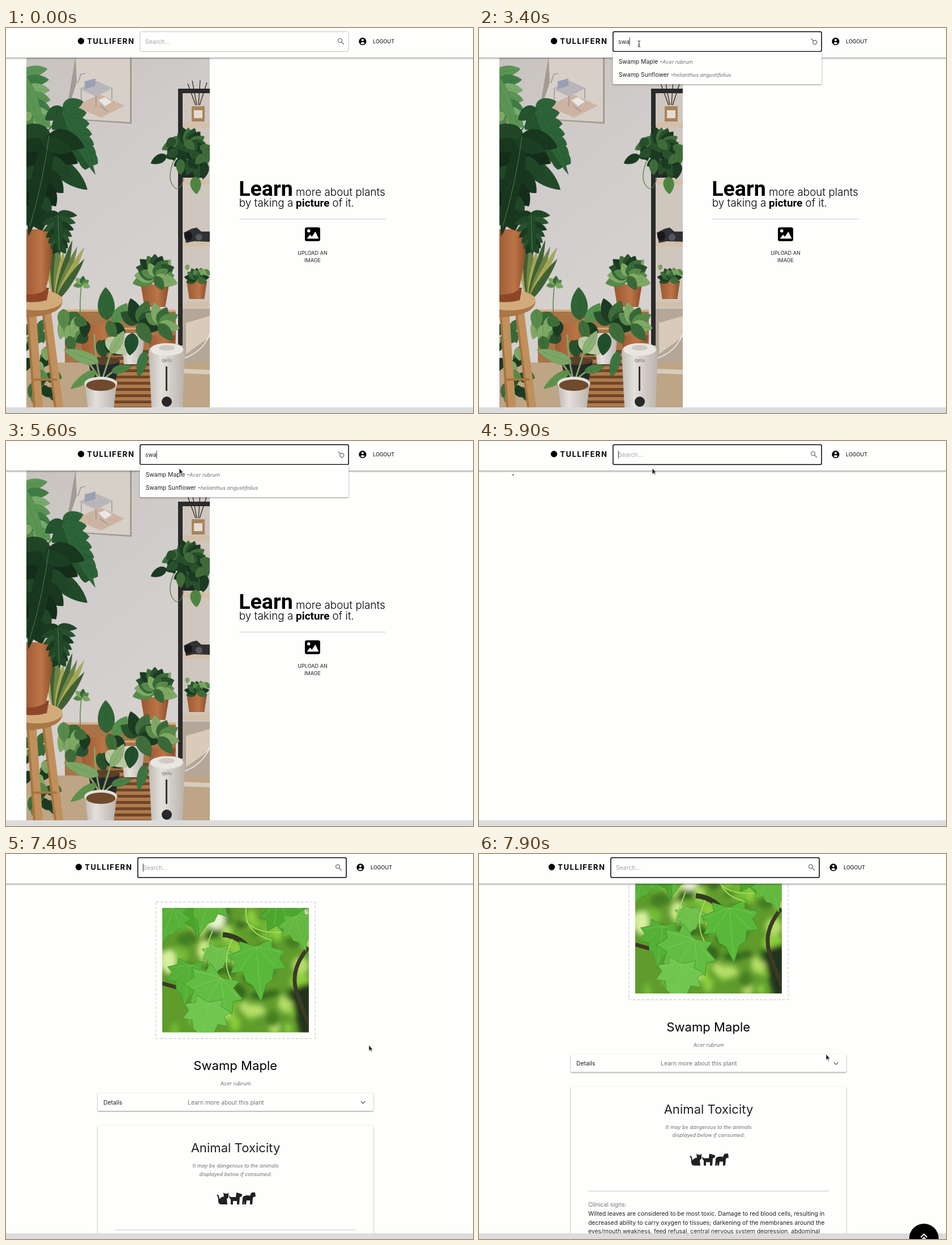
Recreate the animation shown at these times as an HTML page. Size 825 px wide and 679 px high, loop 8000 ms.

```html
<!DOCTYPE html>
<html lang="en">
<head>
<meta charset="utf-8">
<style>
  html, body { margin: 0; width: 100%; height: 100%; overflow: hidden; background: #fefefd; }
  svg { display: block; font: 10.4px Inter, sans-serif; fill: #212121; }
  text { white-space: pre; }
  .light { font-weight: 300; font-size: 18.9px; fill: #000; }
  .strong { font-family: Roboto, sans-serif; font-weight: 700; }
  .small { font-size: 9.1px; }
  .latin { font-size: 9.1px; font-style: italic; fill: #6f6f6f; }
  .title { font-size: 22.1px; }
  .mid { text-anchor: middle; }
  .grey { fill: #757575; }
  .card { fill: #fefefd; filter: drop-shadow(0 1px 1.2px #0007); }
  .line { fill: none; stroke: #c9c9c9; }
</style>
</head>
<body>
<svg width="825" height="679" viewBox="0 0 825 679">
  <defs>
    <clipPath id="roomClip"><path d="M36 50h324v619H36z"/></clipPath>
    <clipPath id="mapleClip"><path d="M276 95h259v219.5H276z"/></clipPath>
    <linearGradient id="wall" x2=".4" y2="1">
      <stop stop-color="#c8c3be"/><stop offset=".4" stop-color="#d0cccb"/><stop offset="1" stop-color="#d8d4d1"/>
    </linearGradient>
    <linearGradient id="clay"><stop stop-color="#9a5731"/><stop offset=".6" stop-color="#bb7546"/><stop offset="1" stop-color="#8a4c2b"/></linearGradient>
    <linearGradient id="white"><stop stop-color="#c0bab5"/><stop offset=".35" stop-color="#e4e0dc"/><stop offset="1" stop-color="#b9b2ac"/></linearGradient>
    <filter id="soft"><feGaussianBlur stdDeviation="5"/></filter>
    <path id="mapleLeaf" d="M0 0-30-12-28 4-52 12-40 24-50 44-28 44-24 62-12 70 0 100 12 70 24 62 28 44 50 44 40 24 52 12 28 4 30-12Z"/>
  </defs>

  <g id="home">
    <g id="room" clip-path="url(#roomClip)"></g>
    <text class="light" y="296"><tspan class="strong" x="411.2" font-size="37.6">Learn</tspan><tspan x="512">more about plants</tspan></text>
    <text class="light" y="314.5"><tspan x="411.8">by taking a</tspan><tspan class="strong" x="512">picture</tspan><tspan x="576.5">of it.</tspan></text>
    <path class="line" d="M412 337H671"/>
    <rect x="528" y="351.5" width="27" height="24.5" rx="3.5" fill="#000"/>
    <path d="M531.5 371.5l5.5-7 3.5 3.5 6-9 6 12.5z" fill="#fefefd"/><circle cx="534.8" cy="357.7" r="2.8" fill="#fefefd"/>
    <g class="small mid"><text x="541.5" y="400">UPLOAD AN</text><text x="541.5" y="413">IMAGE</text></g>
  </g>

  <path id="dot" d="M59 59h2.5v1.5H59z"/>

  <g id="plant">
    <path d="M264.7 84.5H546.3V325.5H264.7z" fill="none" stroke="#d3d3d3" stroke-width="1.3" stroke-dasharray="5 3"/>
    <g id="maple" clip-path="url(#mapleClip)"></g>
    <g class="mid">
      <text class="title" x="405.3" y="381" style="fill:#000">Swamp Maple</text>
      <text class="latin" x="405.7" y="408">Acer rubrum</text>
    </g>
    <rect class="card" x="162" y="421.5" width="487" height="31.5" rx="2"/>
    <text x="172" y="441.5">Details</text><text class="grey" x="321" y="441.5">Learn more about this plant</text>
    <path d="M627 436l3.7 3.7 3.7-3.7" fill="none" stroke="#666" stroke-width="1.4"/>
    <rect class="card" x="162" y="478.5" width="487" height="500" rx="2"/>
    <g class="mid">
      <text class="title" x="405.5" y="526">Animal Toxicity</text>
      <text class="latin" x="405.7" y="553">It may be dangerous to the animals</text>
      <text class="latin" x="405.7" y="567.5">displayed below if consumed:</text>
    </g>
    <path d="M372 601q3-1 4 2 1 4 1 6 2-4 8-5l-1-7 3 2h4l2-2v7q0 3-3 4l1 10h-10q-6 0-6-6 0-8-3-11z
      M394 602l3 3h9l1-8 4 1 6 2v3q-1 2-4 2l-1 13h-4v-6h-7v6h-4v-9q-3-2-3-7z
      M417 618l1-9q-1-4 3-6 6-2 10 0l2-5q3-2 7-1l1 7-4 1-1 2-1 11h-4v-7h-6l-1 7h-3v-6l-1 6z"/>
    <path class="line" d="M193 663H618"/>
    <text class="grey" x="193" y="690.5">Clinical signs:</text>
    <text x="193" y="706.5">Wilted leaves are considered to be most toxic. Damage to red blood cells, resulting in</text>
    <text x="193" y="722">decreased ability to carry oxygen to tissues; darkening of the membranes around the</text>
    <text x="193" y="737.5">eyes/mouth,weakness, feed refusal, central nervous system depression, abdominal</text>
  </g>

  <path d="M-9-9H834V52.3H-9z" fill="#fefefd" style="filter:drop-shadow(0 1.5px 1.6px #0008)"/>
  <g id="header">
    <circle cx="132.5" cy="23" r="5.7" fill="#000"/>
    <text x="143.3" y="28.4" style="font-size:13px;font-weight:700;letter-spacing:1.5px;fill:#000">TULLIFERN</text>
    <rect id="field" x="236.8" y="6.6" width="368.4" height="35" rx="2.6" fill="#fefefd"/>
    <text id="hint" x="246" y="28" fill="#a5a5a5">Search...</text>
    <text id="query" x="246" y="28"></text>
    <path id="caret" d="M0 17v14" stroke="#000" stroke-width=".8"/>
    <g id="lens" fill="none" stroke="#757575" stroke-width="1.4"><circle cx="-1.6" cy="-1.6" r="3.5"/><path d="M1.2 1.2l4 4"/></g>
    <circle cx="630" cy="23.7" r="6.6" fill="#000"/>
    <circle cx="630" cy="21.3" r="2" fill="#fefefd"/><path d="M626.2 26.7q3.8-4 7.6 0-3.8 4-7.6 0" fill="#fefefd"/>
    <text class="small" x="648" y="27" style="fill:#000">LOGOUT</text>
  </g>
  <g id="list"></g>
  <path d="M0 669H825V679H0z" fill="#dcdcdc"/>
  <g id="toTop"><circle cx="786" cy="678" r="26" fill="#000"/><path d="M780.5 676l5.5-5.5 5.5 5.5m-11 6l5.5-5.5 5.5 5.5" fill="none" stroke="#fff" stroke-width="2"/></g>
  <path id="arrow" d="M0 0V10.5L2.4 8.3 4 12 5.6 11.3 4 7.8H7.2Z" stroke="#fff" stroke-width=".6"/>
  <path id="beam" d="M-2.2-5.5q2.2 0 2.2 1.5 0-1.5 2.2-1.5M0-4V4M-2.2 5.5q2.2 0 2.2-1.5 0 1.5 2.2 1.5M-1.3 1.5h2.6" fill="none" stroke="#222"/>
</svg>
<script>
const $ = id => document.getElementById(id);
let seed = 11;
const rnd = () => (seed = seed * 16807 % 2147483647) / 2147483647;
const repeat = (n, make) => Array.from({ length: n }, (_, i) => make(i)).join('');
const shape = (fill, d) => `<path fill="${fill}" d="${d}"/>`;
const stroke = (color, width, d) => `<path fill="none" stroke="${color}" stroke-width="${width}" d="${d}"/>`;
const oval = (fill, x, y, rx, ry = rx) => `<ellipse fill="${fill}" cx="${x}" cy="${y}" rx="${rx}" ry="${ry}"/>`;
const leaf = (fill, x, y, len, angle, w) =>
  `<path fill="${fill}" stroke="#0a2a1033" stroke-width=".6" transform="translate(${x} ${y})rotate(${angle})"
    d="M0 0C${len * .15} ${-w} ${len * .7} ${-w * .8} ${len} 0C${len * .7} ${w * .8} ${len * .15} ${w} 0 0M0 0H${len * .8}"/>`;
const fan = (colors, x, y, n, from, to, len, w) => repeat(n, i =>
  leaf(colors[i % colors.length], x, y, len * (.8 + .25 * rnd()), from + (to - from) * i / (n - 1), w));
const bush = (colors, x, y, rx, ry, n, len) => repeat(n, i => leaf(colors[i % colors.length],
  x + rx * (rnd() * 2 - 1), y + ry * (rnd() * 2 - 1), len * (.7 + .5 * rnd()), 20 + 140 * rnd(), len * .42));
// A midrib with finger lobes on both sides
const monstera = (colors, x, y, len, angle, reach) => `<g transform="translate(${x} ${y})rotate(${angle})">` +
  repeat(14, i => {
    const along = (i >> 1) / 6, side = i % 2 ? 1 : -1;
    return leaf(colors[i % colors.length], len * .72 * along, 0, reach * (1 - .35 * along), side * (80 - 50 * along), len * .13);
  }) + leaf(colors[0], 0, 0, len, 0, reach * .35) + '</g>';
const pot = (fill, x, y, w, h) => shape(fill, `M${x} ${y}h${w}l${-w * .13} ${h}h${-w * .74}z`);

const dark = ['#19371f', '#214627', '#142d1a'];
const mid = ['#28502d', '#1b3b22', '#3f6d3a'];
const fresh = ['#588a4a', '#7fa965', '#386a38'];

$('room').innerHTML =
  shape('url(#wall)', 'M36 50H360V669H36z') +
  // poster
  shape('#a39b92', 'M123 50H222V169L104 161z') + shape('#d6d0c9', 'M123 50H219V166L104 159 125 96z') +
  shape('#cdb4a2', 'M120 138L166 117 210 137 168 158z') + shape('#b9b6bb', 'M129 107l31-14 29 13-30 15z') +
  shape('#9aa0b4', 'M139 94l19-5v13l-19 6z') + shape('#e8e6e6', 'M163 127l12-5 12 8-12 8z') +
  stroke('#8d8990', 1.2, 'M133 109v22M187 107v18M159 120v18M127 97l5-15 8-2M166 137l14 10') +
  // shelf
  shape('#cfc6bd', 'M312 115H360V600H312z') + shape('#b5a797', 'M312 495H360V600H312z') + shape('#d9cbb9', 'M318 520L360 508V545L318 575z') +
  stroke('#2a2b2b', 8, 'M360 111H308V560') +
  repeat(4, i => shape('#d2c0a9', `M312 ${[167, 267, 376, 483][i]}H360v9H312z`)) +
  stroke('#312b26', 1.3, 'M335 136l-14-38M337 136l-8-43M340 136l3-44M342 136l13-40') +
  shape('#a9835b', 'M328 138h23v27h-23z') + shape('#e4dcd2', 'M332 145h15v14h-15z') +
  shape('#222a25', 'M304 212h50l-7 52h-36z') +
  fan(mid, 322, 208, 11, -190, 10, 36, 14) + bush(mid, 318, 215, 36, 22, 24, 28) + leaf('#4e8540', 334, 262, 31, 85, 14) +
  stroke('#55803c', 1.3, 'M296 235q-14 35 4 48 10 3 14-20') +
  shape('#303135', 'M314 361l14-7 9-2 8 7h15v18l-28-1-14 3z') + oval('#17181a', 322, 367, 7, 8) + oval('#55585c', 341, 369, 6) +
  pot('url(#clay)', 319, 446, 36, 32) + fan(mid, 337, 442, 9, -200, 20, 22, 9) + bush(fresh, 336, 426, 15, 9, 8, 14) +
  // calathea and its stand
  shape('#a87447', 'M104 500H300V590H104z') + stroke('#d3ab7b', 3, 'M104 498H300M104 530H300') +
  pot('url(#clay)', 238, 452, 50, 40) +
  fan(fresh, 263, 440, 11, -195, 15, 41, 17) + fan(mid, 263, 428, 7, -170, -10, 34, 13) + fan(fresh, 264, 438, 6, -160, 60, 28, 12) +
  // snake plant
  fan(['#a8a852', '#3f6135', '#6d8547'], 88, 482, 8, -100, -56, 112, 9) +
  // floor and crate
  shape('#bda586', 'M36 590H360V669H36z') + shape('#6f4527', 'M190 568H262V669H190z') +
  repeat(9, i => shape('#ae7a4b', `M190 ${574 + i * 11}h72v6h-72z`)) +
  shape('#d8cbb9', 'M314 601l46 2v8l-46-2z') + stroke('#eee', 1.5, 'M360 540q-12 30-44 42') +
  bush(mid, 58, 575, 24, 62, 18, 30) + bush(fresh, 52, 590, 20, 60, 10, 26) +
  // lower jungle
  stroke('#5f8a50', 1.6, 'M133 455q-4 40 0 60M178 470v60M205 495q6 40 0 60') + fan(fresh, 135, 452, 5, -190, 20, 16, 7) +
  pot('url(#clay)', 128, 522, 75, 60) + pot('url(#white)', 203, 538, 42, 55) + pot('url(#clay)', 250, 542, 50, 34) +
  leaf('#2f6435', 178, 515, 58, -92, 22) + leaf('#54904c', 190, 520, 42, -55, 16) +
  bush(fresh, 118, 512, 22, 22, 8, 38) + bush(mid, 150, 535, 44, 22, 9, 34) +
  fan(mid, 234, 520, 6, -150, 60, 44, 18) + fan(fresh, 270, 522, 6, -140, 50, 38, 15) +
  leaf('#214f2c', 224, 538, 40, 98, 18) + leaf('#3c7540', 246, 570, 48, 105, 13) +
  pot('#26292a', 145, 586, 56, 36) + oval('#59402c', 173, 587, 27, 7) +
  stroke('#83a569', 3, 'M168 625Q150 590 128 572M168 625Q158 590 156 540M168 625Q184 580 190 550M168 625Q190 600 206 602') +
  leaf('#bcc8a0', 176, 548, 46, 35, 20) + leaf('#7ba665', 164, 590, 66, -160, 16) + leaf('#5d924c', 160, 604, 56, -215, 12) +
  leaf('#8db074', 185, 575, 48, -60, 13) + leaf('#498043', 186, 606, 38, -15, 11) +
  pot('url(#white)', 139, 624, 57, 60) + oval('#e4e0da', 167.5, 627, 29, 12) + oval('#6f4a2d', 167.5, 630, 26, 10) +
  // stool and clay pot
  stroke('#c0905c', 14, 'M46 495L58 669M72 495L94 669') + stroke('#a8743f', 4, 'M38 500L50 669M66 505L87 669M46 620H90') +
  shape('#a97745', 'M30 482H100Q98 508 30 511z') + oval('#d3ab7a', 55, 480, 45, 18) +
  shape('#8c4728', 'M30 458H76L72 480Q50 486 30 482z') + shape('url(#clay)', 'M30 355H84Q82 420 70 462 50 474 30 468z') +
  // monstera
  stroke('#3e7338', 2.5, 'M60 200Q80 170 106 150M50 120Q70 180 78 230') +
  monstera(['#5b9455', '#78aa6c', '#3f7c45'], 28, 80, 112, 70, 46) + bush(fresh, 42, 165, 10, 18, 4, 30) +
  monstera(['#2d6338', '#24532d'], 100, 140, 132, 64, 38) +
  leaf('#214a29', 78, 230, 86, 40, 24) + oval('#17351f', 58, 258, 34, 66) +
  monstera(dark, 78, 186, 185, 102, 66) + leaf('#1c3f24', 64, 200, 56, 18, 20) +
  monstera(['#214828', '#1a3a21', '#295330'], 92, 326, 74, 88, 34) +
  stroke('#4f7f4b', 1, 'M76 190Q66 270 42 350M92 330L94 392') +
  // humidifier
  shape('url(#white)', 'M252 572Q252 557 284 556T316 572L312 669H257z') + oval('#e9e5e1', 284, 567, 29, 11) + oval('#cfc9c4', 284, 564, 14, 5) +
  '<text class="mid small" x="284" y="589" fill="#777">qelu</text>' +
  stroke('#333', 3, 'M283.5 597V640') + oval('#26282a', 284, 659, 9);

const mapleLeaves = [
  [330, 78, -8, .72, '#4aa32e'], [362, 66, 15, .8, '#5db43a'], [296, 95, 20, .7, '#58b038'], [480, 82, -30, .85, '#4da72f'],
  [510, 110, -18, .65, '#65b83f'], [325, 195, 8, .75, '#54b036'], [375, 165, 8, .55, '#6fc04b'],
  [380, 218, 32, 1.02, '#62bd42'], [358, 262, 10, .8, '#70c64f'], [442, 163, -5, .98, '#59b83a']
];
$('maple').innerHTML = shape('#5f9c2c', 'M270 90H540V320H270z') + '<g filter="url(#soft)">' +
  repeat(75, i => oval(['#8ccf3e', '#b5dd68', '#437f22', '#74bb35', '#33631b'][i % 5], 276 + 260 * rnd(), 95 + 220 * rnd(), 6 + 15 * rnd(), 5 + 12 * rnd())) +
  oval('#e9f3cf', 372, 115, 15, 18) + oval('#edf2dd', 510, 106, 26, 14) + oval('#d9efa0', 288, 190, 12, 22) + oval('#cce98b', 350, 170, 12, 18) +
  shape('#24301a', 'M500 240L540 225V320H520z') + '</g>' +
  stroke('#333a20', 9, 'M383 142Q420 146 436 178') + stroke('#3b3a27', 7, 'M534 165Q500 205 514 245T535 300M276 228L318 240') +
  mapleLeaves.map(([x, y, angle, size, fill]) =>
    `<g transform="translate(${x} ${y})rotate(${angle})scale(${size})"><use href="#mapleLeaf" fill="${fill}" stroke="#38862a" stroke-width=".7"/>
    <path d="M0 0V90M0 0L-32 40M0 0L32 40M0 0L-42 14M0 0L42 14" stroke="#8fd568" stroke-width=".8" opacity=".7"/></g>`).join('') +
  stroke('#a4d95e', 2, 'M424 95Q420 140 470 152M400 150Q380 190 398 222M365 135Q355 160 345 188M424 118Q440 140 486 138');

const options = [
  'Swamp Maple|Acer rubrum', 'Swamp Sunflower|helianthus angustifolius', 'Swedish Ivy|Plectranthus australis',
  'Sweet Pea|Lathyrus latifolius', 'Sweet Potato Vine|Ipomoea batatas', 'Sweet William|Dianthus barbatus',
  'Sweetheart Hoya|Hoya kerrii', 'Sweetheart Ivy|Hedera helix', 'Swiss Cheese Plant|Monstera deliciosa'
].map(row => row.split('|'));
const drawList = n => n ? `<rect class="card" x="236.3" y="42" width="369" height="${10.4 + 23.4 * n}" rx="2.6"/>` +
  options.slice(0, n).map(([name, latin], i) =>
    `<text x="246.7" y="${62.7 + 23.4 * i}">${name} -<tspan class="latin">${latin}</tspan></text>`).join('') : '';

// Each track holds [start ms, value...]; values switch hard.
const typing = [[0, ''], [1700, 's'], [2800, 'sw'], [3400, 'swa'], [5900, '']];
const rows = [[0, 0], [2800, 9], [3400, 2], [5900, 0]];
const blink = [[0, 0], [600, 1], [1200, 0], [1700, 1], [2400, 0], [2800, 1], [4100, 0], [4700, 1], [5100, 0], [5500, 1], [6500, 0], [7100, 1], [7800, 0]];
const scroll = [[0, 0], [7600, 12], [7700, 31.5], [7800, 51], [7900, 68.5]];
const beamAt = [[0, -50, 0], [400, 284, 28], [1000, 281, 28], [1200, 282.7, 28], [4700, 272, 30], [4800, -50, 0]];
const arrowAt = [[0, -50, 0], [4800, 266, 44], [4900, 282, 51], [5000, 298, 50], [5100, 304, 48], [5300, 306, 48],
  [6500, 320, 80], [6600, 350, 150], [6700, 400, 250], [6800, 455, 350], [6900, 510, 420], [7000, 560, 456],
  [7100, 605, 440], [7200, 646, 370], [7300, 641, 337], [7600, 638, 338], [7700, 632, 340], [7800, 624, 346], [7900, 613, 353]];

const at = (track, t) => track.findLast(step => step[0] <= t).slice(1);
const show = (id, on) => $(id).style.display = on ? '' : 'none';
const move = (id, x, y) => $(id).setAttribute('transform', `translate(${x} ${y})`);
let shownRows = -1;

function draw(now) {
  const t = now % 8000, [query] = at(typing, t), [n] = at(rows, t), [top] = at(scroll, t);
  show('home', t < 5900);
  show('dot', t >= 5900 && t < 6100);
  show('plant', t >= 6100);
  show('toTop', top > 66);
  show('hint', !query);
  show('caret', at(blink, t)[0]);
  move('header', t < 6100 ? 0 : -4, 0);
  move('plant', 0, -top);
  $('query').textContent = query;
  move('caret', 246.3 + (query ? $('query').getComputedTextLength() : 0), 0);
  $('field').setAttribute('stroke', t < 400 ? '#c4c4c4' : t < 600 ? '#212121' : '#000');
  $('field').setAttribute('stroke-width', t < 600 ? 1 : 1.5);
  $('lens').setAttribute('transform', `translate(591.7 23.7)rotate(${n ? 180 : 0})`);
  if (n !== shownRows) $('list').innerHTML = drawList(shownRows = n);
  move('beam', ...at(beamAt, t));
  move('arrow', ...at(arrowAt, t));
  requestAnimationFrame(draw);
}
requestAnimationFrame(draw);
</script>
</body>
</html>
```
